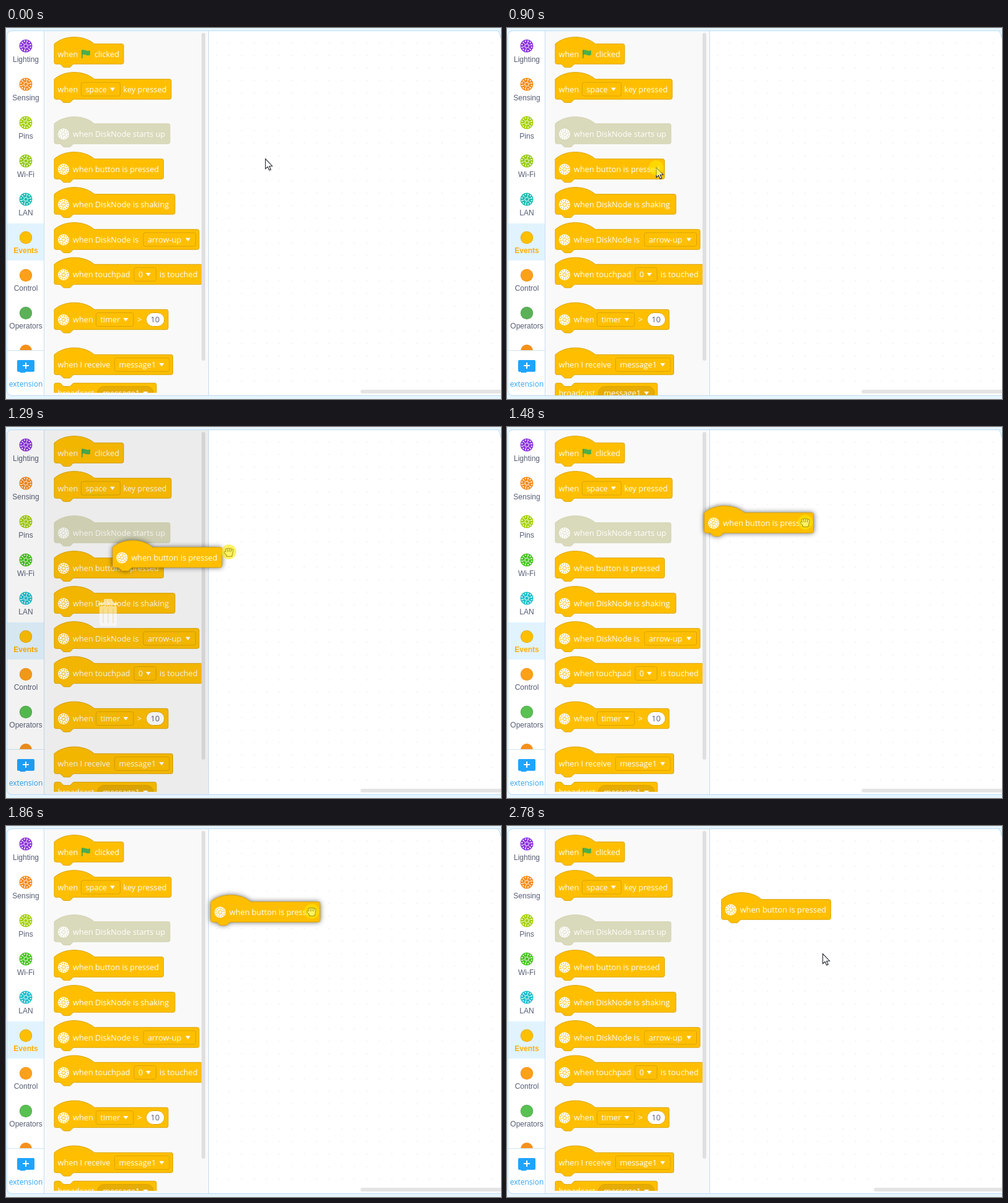
Animation, 800 px wide and 600 px high, one loop 2.96 s. Source, as an HTML page with a canvas:

```html
<!DOCTYPE html>
<html lang="en">
<head>
<meta charset="utf-8">
<title>Dragging an event block</title>
<style>
html, body { margin: 0; width: 100%; height: 100%; overflow: hidden; background: #e6f5ff; }
canvas { display: block; width: 800px; height: 600px; }
</style>
</head>
<body>
<canvas id="stage" width="800" height="600"></canvas>
<script>
const ctx = document.getElementById('stage').getContext('2d');
const LOOP = 2960;
const UNIT = 0.675; // block zoom
const YELLOW = '#ffbf00', EDGE = '#dba300', FRAME = '#bcdcf5';
const BLOCK_FONT = '500 12.75px "Open Sans", "Noto Sans", sans-serif';
const LABEL_FONT = '12px "Liberation Sans", Arial, sans-serif';

// The picture is refreshed only at these moments.
const ticks = [0, 240, 340, 440, 530, 620, 720, 900, 1000, 1100, 1190, 1300, 1400,
  1480, 1570, 1670, 1770, 1860, 2040, 2130, 2220, 2400, 2500, 2590, 2690, 2780];

// Paths: time, x, y
const pointerPath = [[150, 419, 212], [530, 291, 219], [640, 254, 224], [720, 241, 226],
  [900, 241, 226], [1000, 272, 223], [1100, 326, 214], [1400, 440, 174],
  [1480, 482, 154], [1860, 494, 138], [2220, 510, 132], [2500, 510, 132], [2780, 510, 207]];
const dragPath = [[900, 78, 228], [1000, 94, 227], [1100, 134, 225], [1400, 262, 178],
  [1480, 319, 155], [1860, 331, 139], [2220, 346.7, 135]];
const dimPath = [[1000, 0, 0], [1100, 0.03, 0.4], [1190, 0.05, 0.55], [1400, 0, 0]];

function along(path, t) {
  const next = path.findIndex(p => p[0] > t);
  if (next === 0) return path[0].slice(1);
  if (next < 0) return path[path.length - 1].slice(1);
  const a = path[next - 1], b = path[next], k = (t - a[0]) / (b[0] - a[0]);
  return [a[1] + (b[1] - a[1]) * k, a[2] + (b[2] - a[2]) * k];
}

function rect(x, y, w, h, color) {
  ctx.fillStyle = color;
  ctx.fillRect(x, y, w, h);
}

function rounded(x, y, w, h, r, fill, stroke) {
  ctx.beginPath();
  ctx.roundRect(x, y, w, h, r);
  if (fill) { ctx.fillStyle = fill; ctx.fill(); }
  if (stroke) { ctx.strokeStyle = stroke; ctx.lineWidth = 1; ctx.stroke(); }
}

function disc(x, y, r, color) {
  ctx.beginPath();
  ctx.arc(x, y, r, 0, Math.PI * 2);
  ctx.fillStyle = color;
  ctx.fill();
}

function line(x1, y1, x2, y2, color, width = 1) {
  ctx.beginPath();
  ctx.moveTo(x1, y1);
  ctx.lineTo(x2, y2);
  ctx.strokeStyle = color;
  ctx.lineWidth = width;
  ctx.stroke();
}

function write(str, x, y, color = '#fff', font = BLOCK_FONT, align = 'left') {
  ctx.font = font;
  ctx.textAlign = align;
  ctx.fillStyle = color;
  ctx.fillText(str, x, y);
}

// Round board icon: a disc with a ring of small marks
function board(x, y, r, base, mark) {
  disc(x, y, r, base);
  for (let i = 0; i < 12; i++) {
    const a = (i + 0.5) * Math.PI / 6, c = Math.cos(a), s = Math.sin(a);
    disc(x + c * r * 0.76, y + s * r * 0.76, r * 0.105, mark);
    if (i % 2) line(x + c * r * 0.4, y + s * r * 0.4, x + c * r * 0.62, y + s * r * 0.62, mark, 1);
  }
  ctx.beginPath();
  ctx.arc(x, y, r * 0.3, 0, Math.PI * 2);
  ctx.strokeStyle = mark;
  ctx.lineWidth = 1;
  ctx.stroke();
}

// Block outline in unscaled units; the origin is the top left of its body
function blockPath(x, top, right, hat) {
  const w = (right - x) / UNIT, h = 48;
  const p = new Path2D();
  if (hat) {
    p.moveTo(0, 0);
    p.bezierCurveTo(25, -22, 71, -22, 96, 0);
  } else {
    p.moveTo(0, 4);
    p.quadraticCurveTo(0, 0, 4, 0);
    p.lineTo(12, 0);
    p.bezierCurveTo(16, 0, 17, 3, 20, 6);
    p.quadraticCurveTo(22, 8, 24, 8);
    p.lineTo(36, 8);
    p.quadraticCurveTo(38, 8, 40, 6);
    p.bezierCurveTo(43, 3, 44, 0, 48, 0);
  }
  p.lineTo(w - 4, 0);
  p.quadraticCurveTo(w, 0, w, 4);
  p.lineTo(w, h - 4);
  p.quadraticCurveTo(w, h, w - 4, h);
  p.lineTo(48, h);
  p.bezierCurveTo(44, h, 43, h + 3, 40, h + 6);
  p.quadraticCurveTo(38, h + 8, 36, h + 8);
  p.lineTo(24, h + 8);
  p.quadraticCurveTo(22, h + 8, 20, h + 6);
  p.bezierCurveTo(17, h + 3, 16, h, 12, h);
  p.lineTo(4, h);
  p.quadraticCurveTo(0, h, 0, h - 4);
  p.closePath();
  const placed = new Path2D();
  placed.addPath(p, new DOMMatrix([UNIT, 0, 0, UNIT, x, top]));
  return placed;
}

function block(x, mid, right, { hat = true, fill = YELLOW, edge = EDGE, shadow = false } = {}) {
  const p = blockPath(x, mid - 16.2, right, hat);
  ctx.save();
  if (shadow) { ctx.shadowColor = 'rgba(0,0,0,.65)'; ctx.shadowBlur = 9; }
  ctx.fillStyle = fill;
  ctx.fill(p);
  ctx.restore();
  ctx.strokeStyle = edge;
  ctx.lineWidth = 1;
  ctx.stroke(p);
}

function say(str, x, mid) { write(str, x, mid + 4.6); }

function arrowDown(x, mid) {
  ctx.beginPath();
  ctx.moveTo(x - 4, mid - 2.5);
  ctx.lineTo(x + 4, mid - 2.5);
  ctx.lineTo(x, mid + 3);
  ctx.closePath();
  ctx.fillStyle = '#fff';
  ctx.fill();
}

function menu(str, x, right, mid) {
  rounded(x, mid - 11, right - x, 22, 3, YELLOW, EDGE);
  say(str, x + 7, mid);
  arrowDown(right - 12.5, mid);
}

function boardBlock(str, x, mid, right, options) {
  block(x, mid, right, options);
  board(x + 15, mid + 0.5, 9, '#fff', options && options.fill || YELLOW);
  say(str, x + 30, mid);
}

function flag(x, y) {
  ctx.beginPath();
  ctx.moveTo(x, y);
  ctx.bezierCurveTo(x + 4, y - 2.5, x + 7, y + 3, x + 13.5, y);
  ctx.lineTo(x + 13.5, y + 7.5);
  ctx.bezierCurveTo(x + 7, y + 10.5, x + 5, y + 5, x + 0.5, y + 7.5);
  ctx.closePath();
  ctx.fillStyle = '#4cae4f';
  ctx.fill();
  line(x + 0.5, y - 0.5, x + 0.5, y + 13, '#45993d', 1.4);
}

function palette(bottom) {
  rect(62, 5, 265, 589, '#f9f9f9');
  ctx.save();
  ctx.beginPath();
  ctx.rect(62, 5, 265, bottom - 5);
  ctx.clip();

  block(78, 42, 190);
  say('when', 83.5, 42);
  flag(122.5, 36);
  say('clicked', 143, 42);

  block(78, 99, 267);
  say('when', 83.5, 99);
  menu('space', 121.5, 184.5, 99);
  say('key pressed', 189.5, 99);

  boardBlock('when DiskNode starts up', 78, 171, 265, { fill: '#d9d9bb', edge: '#d3d2b2' });
  boardBlock('when button is pressed', 78, 228, 254.5);
  boardBlock('when DiskNode is shaking', 78, 285, 273);

  boardBlock('when DiskNode is', 78, 342, 312);
  menu('arrow-up', 222, 306.5, 342);

  boardBlock('when touchpad', 78, 398.5, 317);
  menu('0', 207, 242.5, 398.5);
  say('is touched', 248, 398.5);

  boardBlock('when', 78, 471.5, 262);
  menu('timer', 145.5, 206, 471.5);
  say('>', 212, 471.5);
  rounded(226.5, 460.5, 29.5, 22, 11, '#fff', EDGE);
  write('10', 241, 476, '#575e75', BLOCK_FONT, 'center');

  block(78, 544.5, 269.5);
  say('when I receive', 83.5, 544.5);
  menu('message1', 175.5, 264, 544.5);

  block(78, 590.5, 243, { hat: false });
  say('broadcast', 83.5, 590.5);
  rounded(147.5, 579.5, 91, 22, 11, '#e6ac00', EDGE);
  say('message1', 156.5, 590.5);
  arrowDown(225.5, 590.5);
  ctx.restore();

  rounded(316, 8, 6, 530, 3, '#dfdfdf');
}

function categories(late) {
  rect(2, 5, 59, 589, '#fff');
  rect(2, 316, 59, 60, '#e1f3ff');
  const boards = [['Lighting', '#8a32db'], ['Sensing', '#f58a1c'], ['Pins', '#a3d000'],
    ['Wi-Fi', late ? '#45c41c' : '#93ca10'], ['LAN', late ? '#1abecb' : '#17bdb2']];
  boards.forEach(([name, color], i) => {
    board(32, 29 + 62 * i, 10.5, color, '#fff');
    write(name, 32, 55 + 62 * i, '#575e75', LABEL_FONT, 'center');
  });
  const plain = [['Events', YELLOW, '#e0a500'], ['Control', '#ffa01a', '#ef9214'],
    ['Operators', late ? '#59c152' : '#5cb158', '#4fa54b']];
  plain.forEach(([name, color, edge], i) => {
    disc(32, 339 + 61 * i, 10.2, edge);
    disc(32, 339 + 61 * i, 9.4, color);
    write(name, 32, 364 + 61 * i, i ? '#575e75' : '#ffae00', (i ? '' : 'bold ') + LABEL_FONT, 'center');
  });
  disc(32, 522, 10, '#f5901c');
  rect(2, 521, 59, 73, '#fff');
  line(2, 521.5, 61, 521.5, '#cfe5f6');

  rounded(18, 537, 28, 19, 2, '#1fa4ff');
  rounded(22, 555, 10, 2.5, [0, 0, 2, 2], '#1fa4ff');
  line(27, 546, 37, 546, '#fff', 2);
  line(32, 541, 32, 551, '#fff', 2);
  write('extension', 32, 580, '#2ba3f7', '12px "Open Sans", "Noto Sans", sans-serif', 'center');
}

function workspace(scrollX) {
  rect(328, 5, 472, 590, '#fff');
  for (let y = 23.5; y < 590; y += 20.25)
    for (let x = 339.5; x < 800; x += 20.25) rect(x, y, 1.3, 1.3, '#e2e4e8');
  rounded(scrollX, 585, 240, 6, 3, '#e4e4e4');
}

function trash(alpha) {
  ctx.save();
  ctx.globalAlpha = alpha;
  rounded(149, 284, 32, 4, 1, '#fff');
  rounded(158, 278, 14, 6, 2, '#fff');
  rounded(151, 290, 28, 32, [0, 0, 3, 3], '#fff');
  ctx.globalAlpha = alpha * 0.5;
  for (let x = 157; x < 176; x += 8) line(x, 294, x, 317, '#d8a93a', 1.5);
  ctx.restore();
}

function arrowPointer(x, y) {
  ctx.beginPath();
  [[0, 0], [0, 16], [3.6, 12.7], [6.3, 18.4], [8.8, 17.3], [6.2, 11.7], [11, 11.5]]
    .forEach(([dx, dy]) => ctx.lineTo(x + 0.3 + dx, y - 0.3 + dy));
  ctx.closePath();
  ctx.fillStyle = '#fff';
  ctx.fill();
  ctx.strokeStyle = '#20242c';
  ctx.lineWidth = 1.1;
  ctx.stroke();
}

function handPointer(x, y, open) {
  const reach = open ? 1 : 0.6;
  const tips = [[-4, -6], [-1, -7.5], [2.2, -7], [5.4, -4.8]];
  const draw = (color, width, grow) => {
    ctx.lineCap = 'round';
    tips.forEach(([dx, dy], i) => line(x - 3 + i * 2.4, y + 3, x + dx, y + dy * reach, color, width));
    line(x - 2, y + 4, x - 6, y + (open ? 0.5 : 1), color, width);
    rounded(x - 4 - grow, y - grow, 9 + 2 * grow, 7 + 2 * grow, 3, color);
    ctx.lineCap = 'butt';
  };
  draw('#20242c', 4.2, 1);
  draw('#fff', 2.2, 0);
  for (let i = 0; i < 3; i++)
    line(x - 2.4 + i * 3, y - (open ? 5 : 3), x - 1.8 + i * 2.4, y, '#20242c', 0.8);
}

function draw(now) {
  const time = now % LOOP;
  const t = ticks.filter(k => k <= time).pop();
  const [px, py] = along(pointerPath, t);
  const [bx, by] = along(dragPath, t);
  const [dim, bin] = along(dimPath, t);
  const pressed = t >= 900 && t < 2400;
  const dropped = t >= 2500;

  rect(0, 0, 800, 600, '#e6f5ff');
  ctx.save();
  ctx.beginPath();
  ctx.roundRect(1.5, 4.5, 820, 590, 8);
  ctx.clip();
  categories(t >= 1100);
  palette(t >= 530 && t < 1000 ? 594 : 590);
  workspace(dropped ? 593 : 573);
  line(61.5, 5, 61.5, 594, '#c6def1');
  line(327.5, 5, 327.5, 594, '#c6dcec');
  if (dim) rect(2, 5, 325, 589, `rgba(0,0,0,${dim})`);
  ctx.restore();
  rounded(1.5, 4.5, 820, 590, 8, null, FRAME);

  ctx.beginPath();
  ctx.moveTo(795, 4.5);
  ctx.quadraticCurveTo(798.5, 9, 800, 17);
  ctx.lineTo(801, 4.5);
  ctx.fillStyle = '#e6f5ff';
  ctx.fill();
  ctx.strokeStyle = FRAME;
  ctx.stroke();

  if (t >= 1000) boardBlock('when button is pressed', bx, by, bx + 176.5, { shadow: !dropped });
  if (bin) trash(bin);

  if (t >= 1190 && t < 2690) handPointer(px, py, !pressed);
  else arrowPointer(px, py);
  if (pressed) disc(px, py, 12, 'rgba(255,234,0,.6)');
}

function loop() {
  draw(performance.now());
  requestAnimationFrame(loop);
}
loop();
</script>
</body>
</html>
```
